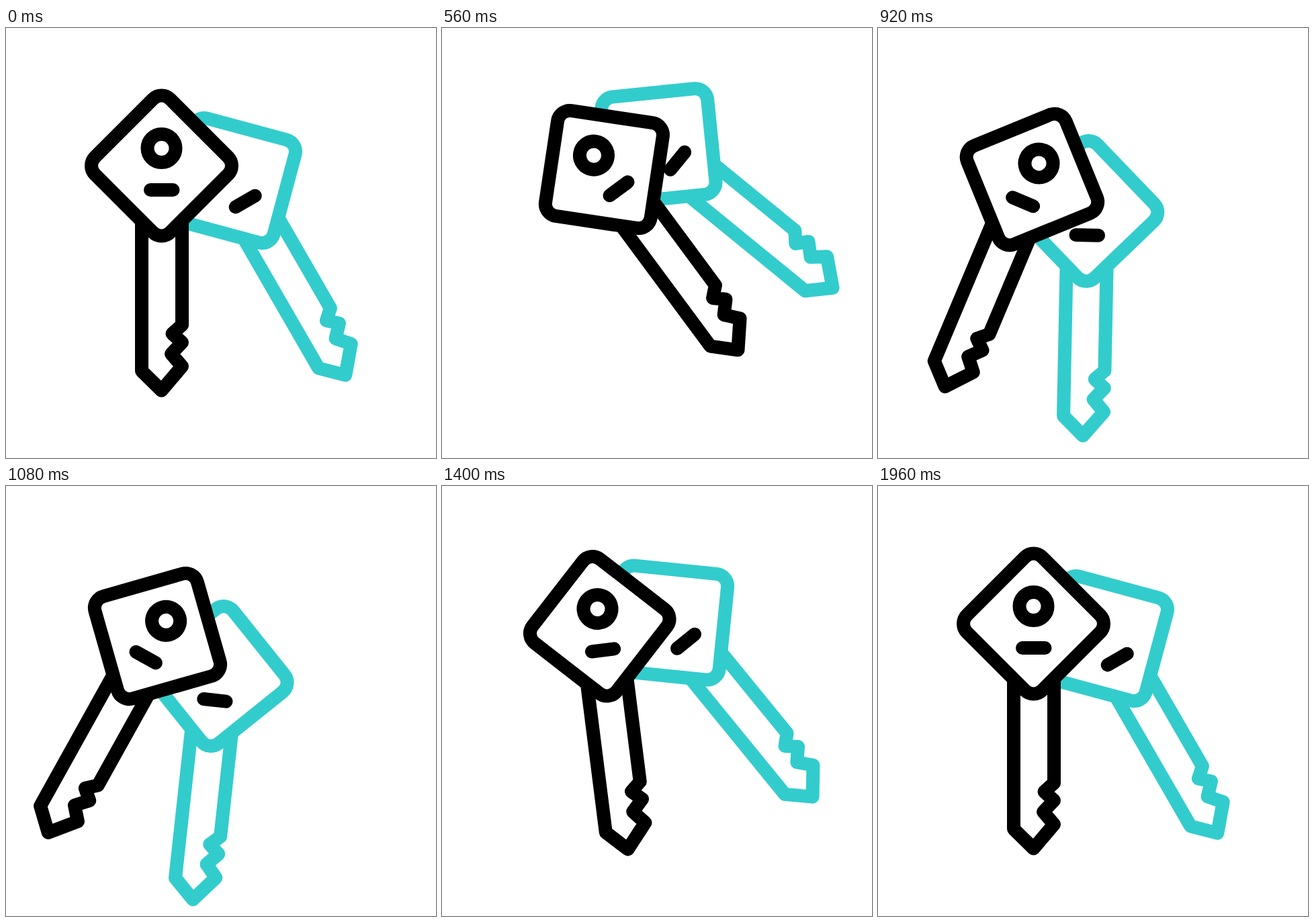
An HTML page that plays this animation: 640 by 640 pixels, repeating every 2 s.

```html
<!DOCTYPE html>
<html lang="en">
<head>
<meta charset="utf-8">
<title>Swinging keys</title>
<style>
  html, body { margin: 0; width: 100%; height: 100%; overflow: hidden; background: #fff; }
  svg { display: block; width: 100%; height: 100%; }
  g { fill: #fff; stroke-width: 20; stroke-linecap: round; stroke-linejoin: round; }
  .front { stroke: #000; }
  .back { stroke: #33cccc; }
  .bar { stroke: #000; }
</style>
</head>
<body>
<svg viewBox="0 0 640 640">
  <defs>
    <g id="key">
      <path d="M-29.5 75V305.5L0 334.5L30.5 298.5L14.5 280L30.5 263L16 250L30.5 237V75"/>
      <rect x="-79.2" y="-79.2" width="158.4" height="158.4" rx="18.2" transform="rotate(45)"/>
      <path class="bar" d="M-16.5 36H17"/>
    </g>
  </defs>
  <g class="back" id="back"><use href="#key"/></g>
  <g class="front" id="front"><use href="#key"/><circle cy="-26" r="21"/></g>
</svg>
<script>
const LOOP = 2000, STEP = 40, HOLE = 26;

// Swings between turning points [ms, value], easing in and out like a pendulum.
function swing(...turns) {
  return t => {
    const next = turns.findIndex(p => p[0] > t);
    if (next === 0) return turns[0][1];
    if (next < 0) return turns[turns.length - 1][1];
    const [t0, v0] = turns[next - 1], [t1, v1] = turns[next];
    return v0 + (v1 - v0) * (1 - Math.cos(Math.PI * (t - t0) / (t1 - t0))) / 2;
  };
}

const frontTurn = swing([40, 0], [620, 37.5], [1010, -31.5], [1455, 8.7], [1960, 0]);
const backTurn = swing([40, 30], [485, 53.5], [1040, -8], [1365, 39.3], [1960, 30]);

// Hole of the front key, from which it hangs.
const holeX = swing([40, 231.5], [470, 224.8], [980, 240], [1300, 231.5]);
const holeY = swing([160, 179], [1000, 202], [1550, 179]);

// Centre of the back key, measured along the axes of the front key.
const across = swing([220, 106.5], [690, 81.8], [1190, 110], [1640, 99.1], [1960, 106.5]);
const along = swing([340, 22], [1200, 8], [1400, 8], [1960, 22]);

const front = document.getElementById("front");
const back = document.getElementById("back");

function place(key, x, y, turn) {
  key.setAttribute("transform", `translate(${x.toFixed(2)} ${y.toFixed(2)}) rotate(${(-turn).toFixed(2)})`);
}

function draw(now) {
  const t = Math.floor(now % LOOP / STEP) * STEP;
  const turn = frontTurn(t), a = turn * Math.PI / 180;
  const sin = Math.sin(a), cos = Math.cos(a);
  const x = holeX(t) + HOLE * sin, y = holeY(t) + HOLE * cos;
  const u = across(t), v = along(t);
  place(front, x, y, turn);
  place(back, x + u * cos + v * sin, y - u * sin + v * cos, backTurn(t));
}

const start = performance.now();
function tick() {
  draw(performance.now() - start);
  requestAnimationFrame(tick);
}
tick();
</script>
</body>
</html>
```
